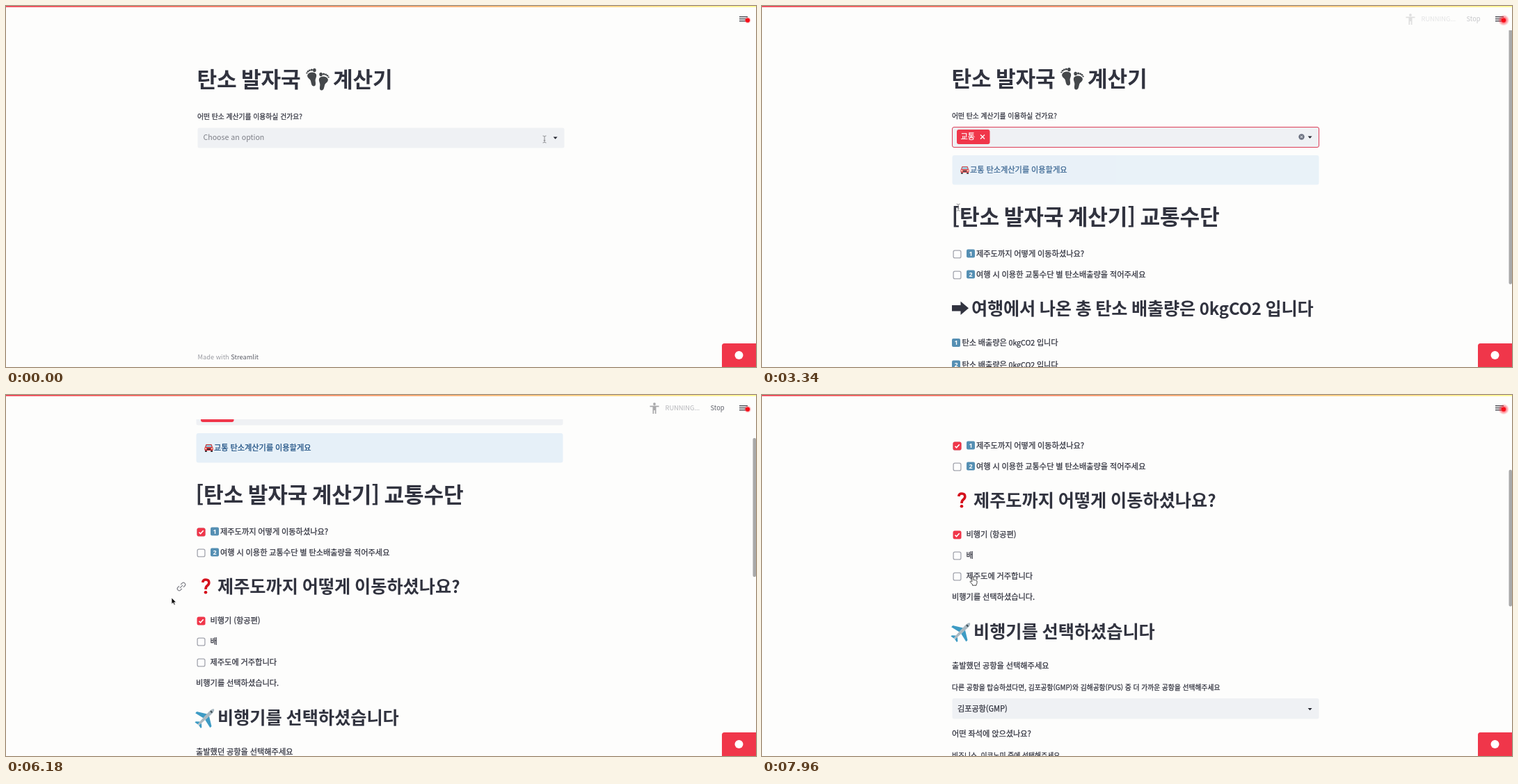
These frames come from a looping animation (1078x520 px, 8 s). An HTML page:

```html
<!DOCTYPE html>
<html lang="ko">
<head>
<meta charset="utf-8">
<title>탄소 발자국 계산기</title>
<style>
  html, body { margin: 0; width: 100%; height: 100%; overflow: hidden; background: #fdfdfc; }
  svg { display: block; }
  #stage { width: 1078px; height: 520px; }
  text { font-family: "Noto Sans CJK KR", "Noto Sans CJK", "Noto Sans", sans-serif; color: #31333f; fill: currentColor; white-space: pre; }
  .h1 { font-size: 31.2px; font-weight: 700; letter-spacing: -.2px; word-spacing: -1.9px; }
  .h2 { font-size: 25.2px; font-weight: 700; word-spacing: -1.2px; }
  .b { font-size: 11.2px; word-spacing: -.3px; }
  .s { font-size: 9.8px; }
  .b, .s { stroke: currentColor; stroke-width: .25; }
  .latin { font-size: .95em; }
  .foot { font-size: 9.25px; color: #9a9ba2; }
  .run { font-size: 9.3px; }
  .digit { font: 700 9px "Noto Sans", sans-serif; color: #fff; text-anchor: middle; }
  .box { fill: #fdfdfd; stroke: #a3a5ae; stroke-width: 1.3; }
  .field { fill: #eff1f4; }
  .red { fill: #f0364a; }
  .off { display: none; }
</style>
</head>
<body>
<svg id="stage" viewBox="0 0 1078 520">
  <defs>
    <linearGradient id="bar">
      <stop offset="0" stop-color="#f0364a"/>
      <stop offset=".5" stop-color="#fb9a62"/>
      <stop offset="1" stop-color="#fffb8c"/>
    </linearGradient>
    <radialGradient id="halo">
      <stop offset=".3" stop-color="#ff2030" stop-opacity=".75"/>
      <stop offset="1" stop-color="#ff2030" stop-opacity="0"/>
    </radialGradient>
    <filter id="shadow" x="-10%" y="-20%" width="120%" height="150%">
      <feDropShadow dx="0" dy="3" stdDeviation="4.5" flood-color="#1a2030" flood-opacity=".32"/>
    </filter>
    <g id="sole" fill="#45484b">
      <path d="M1.5 10C3 5 11 5 12.5 9C13.5 13 11 15 11.5 19C12 23 12 26 9.5 26C6.5 26 6.5 22 5.5 18C4.5 15 .8 14 1.5 10Z"/>
      <ellipse cx="10.3" cy="3" rx="2" ry="2.8"/>
      <circle cx="6.8" cy="2.4" r="1.5"/>
      <circle cx="4.2" cy="3.2" r="1.3"/>
      <circle cx="2.2" cy="4.8" r="1.2"/>
      <circle cx=".8" cy="7" r="1.1"/>
    </g>
    <rect id="key" width="12" height="12" rx="2" fill="#558fb3"/>
    <rect id="check" class="box" x="-5.4" y="-5.4" width="10.8" height="10.8" rx="2.2"/>
    <g id="tick">
      <rect class="red" x="-6" y="-6" width="12" height="12" rx="2.5"/>
      <path d="M-3 .2l2.1 2.2L3.2-2.3" fill="none" stroke="#fff" stroke-width="1.6"/>
    </g>
    <path id="caret" d="M-3-1.4h6L0 1.7z" fill="#22242e"/>
    <g id="chain" fill="none" stroke="#85868d" stroke-width="1.3" transform="rotate(-45)">
      <path d="M-1.5-2.7h-2.7a2.7 2.7 0 0 0 0 5.4h2.7M1.5-2.7h2.7a2.7 2.7 0 0 1 0 5.4h-2.7M-3 0h6"/>
    </g>
  </defs>

  <rect width="1078" height="520" fill="#fdfdfc"/>

  <g id="page">
    <text class="h1" x="274.5" y="117">탄소 발자국</text>
    <use href="#sole" transform="translate(431.5 89.5) scale(1.15 1)"/>
    <use href="#sole" transform="translate(464.5 95.5) scale(-1.15 1)"/>
    <text class="h1" x="470" y="117">계산기</text>
    <text class="s" x="275" y="162.6">어떤 탄소 계산기를 이용하실 건가요?</text>

    <rect id="select" class="field" x="275.5" y="175.5" width="527" height="29" rx="2.5"/>
    <text id="hint" x="283.5" y="193" style="font-size:10.6px;color:#7d7f87">Choose an option</text>
    <use href="#caret" x="789.6" y="190"/>
    <g id="tag">
      <rect class="red" x="282" y="179" width="47.5" height="21" rx="3"/>
      <text class="b" x="287.5" y="193.3" style="color:#fff">교통</text>
      <path d="M316 186.500l6 6m0-6l-6 6" stroke="#fff" stroke-width="1.3"/>
      <circle cx="777.5" cy="189.5" r="4.2" fill="#6e7483"/>
      <path d="M775.9 187.9l3.2 3.2m0-3.2l-3.2 3.2" stroke="#fff"/>
    </g>

    <g id="result">
      <g id="alert">
        <rect x="275.5" y="216" width="527" height="42.5" rx="3" fill="#e6f0f8"/>
        <g transform="translate(287 231)">
          <path d="M2.5 1h8l1.6 4.2H.9z" fill="#c92f35"/>
          <path d="M3.3 2h6.4l1 3H2.3z" fill="#8fc3d8"/>
          <rect x=".3" y="5" width="12.4" height="5" rx="1.5" fill="#d8343a"/>
          <path d="M1 10h2.8v2H1zM9.2 10H12v2H9.2zM4 7h5v2H4z" fill="#3c3035"/>
          <path d="M1.2 6.5h2v1.5h-2zM9.8 6.5h2v1.5h-2z" fill="#fff0c8"/>
        </g>
        <text class="b" x="301" y="241.1" style="color:#1a4d80">교통 탄소계산기를 이용할게요</text>
      </g>
      <text class="h1" x="274.5" y="316">[탄소 발자국 계산기] 교통수단</text>

      <use href="#check" x="282.5" y="358.5"/>
      <use id="tick1" href="#tick" x="282.5" y="358.5"/>
      <use href="#key" x="296" y="351.5"/><text class="digit" x="302" y="360.8">1</text>
      <text class="b" x="310" y="361.5">제주도까지 어떻게 이동하셨나요?</text>
      <use href="#check" x="282.5" y="388.5"/>
      <use href="#key" x="296" y="381.5"/><text class="digit" x="302" y="390.8">2</text>
      <text class="b" x="310" y="391.5">여행 시 이용한 교통수단 별 탄소배출량을 적어주세요</text>
      <use id="link" href="#chain" transform="translate(254 437)"/>

      <g id="total">
        <path d="M275 432h12.500v-5.500l11.500 9.800-11.500 9.800v-5.500H275z" fill="#31333f"/>
        <text class="h2" x="303" y="445.5" letter-spacing="-.15">여행에서 나온 총 탄소 배출량은 <tspan class="latin">0kgCO2</tspan> 입니다</text>
        <use href="#key" x="275" y="480"/><text class="digit" x="281" y="489.3">1</text>
        <text class="b" x="289.5" y="490.2" letter-spacing="-.05">탄소 배출량은 <tspan class="latin">0kgCO2</tspan> 입니다</text>
        <use href="#key" x="275" y="511.5"/><text class="digit" x="281" y="520.8">2</text>
        <text class="b" x="289.5" y="521.7" letter-spacing="-.05">탄소 배출량은 <tspan class="latin">0kgCO2</tspan> 입니다</text>
      </g>

      <g id="trip">
        <path d="M284.7 431q.3-4 4.5-4q4.6 0 4.6 4.3q0 2.6-2.6 4.4q-2.2 1.6-2.2 5.3" fill="none" stroke="#d5101c" stroke-width="3.6"/>
        <circle cx="289" cy="445.2" r="2.3" fill="#d5101c"/>
        <text class="h2" x="306" y="445.5">제주도까지 어떻게 이동하셨나요<tspan class="latin">?</tspan></text>
        <use href="#tick" x="282.5" y="486.5"/>
        <text class="b" x="295.5" y="489.8">비행기 (항공편)</text>
        <use href="#check" x="282.5" y="516.5"/>
        <text class="b" x="295.5" y="519.8">배</text>
        <use href="#check" x="282.5" y="546.5"/>
        <text class="b" x="295.5" y="549.8">제주도에 거주합니다</text>
        <text class="b" x="275" y="580">비행기를 선택하셨습니다.</text>
        <g transform="translate(289 625.5) rotate(45)">
          <path d="M-2-5L-15 3v3l13-3zM2-5l13 8v3L2 3zM-1.5 10L-6 14v2l5-1zM1.5 10L6 14v2l-5-1z" fill="#3d9bc4"/>
          <path d="M0-17c2 1 2.6 4 2.6 7L1.6 12 0 16l-1.6-4L-2.6-10c0-3 .6-6 2.6-7z" fill="#a9b9c2"/>
          <path d="M-1.6-12.5h3.2v2h-3.2z" fill="#37474f"/>
        </g>
        <text class="h2" x="306" y="635">비행기를 선택하셨습니다</text>
        <text class="b" x="275" y="679.3">출발했던 공항을 선택해주세요</text>
        <text class="s" x="275" y="709.8" letter-spacing="-.03">다른 공항을 탑승하셨다면, 김포공항(GMP)와 김해공항(PUS) 중 더 가까운 공항을 선택해주세요</text>
        <rect class="field" x="275.5" y="722" width="527" height="29.5" rx="2.5"/>
        <text class="b" x="283" y="741" letter-spacing="-.1">김포공항(GMP)</text>
        <use href="#caret" x="789.6" y="737.5"/>
        <text class="b" x="275" y="777.2">어떤 좌석에 앉으셨나요?</text>
        <text class="s" x="275" y="807.8">비즈니스, 이코노미 중에 선택해주세요</text>
      </g>
    </g>

    <g id="menu">
      <rect x="275.5" y="205" width="527" height="119" rx="2" fill="#fefefe" filter="url(#shadow)"/>
      <rect x="275.5" y="205" width="527" height="30" fill="#f0f2f2"/>
      <text class="b" x="287.5" y="223.1">교통</text>
      <text class="b" x="287.5" y="253.1">음식</text>
      <text class="b" x="287.5" y="283.1">관광</text>
      <text class="b" x="287.5" y="313.1">숙소</text>
    </g>
    <text id="footer" class="foot" x="275.5">Made with <tspan fill="#5a5c66" font-weight="500">Streamlit</tspan></text>
  </g>

  <rect id="thumb" x="1073.5" width="4.5" rx="2" fill="#a9a9a9"/>

  <rect width="1078" height="35" fill="#fdfdfc"/>
  <rect width="1078" height="1.6" fill="url(#bar)"/>
  <g id="running">
    <circle cx="932" cy="13" r="1.9" fill="#a9a9ab"/>
    <path d="M925.5 15.500h13v1.800h-4V27h-1.700v-5h-1.600v5h-1.700v-9.700h-4z" fill="#a9a9ab"/>
    <text class="run" x="947.5" y="22.4" style="color:#b4b5b9">RUNNING...</text>
    <text class="run" x="1012.5" y="22.4" style="color:#62646d">Stop</text>
  </g>
  <path d="M1054 15.700h12M1054 18.700h12M1054 21.700h12" stroke="#34363f" stroke-width="1.3"/>
  <circle id="glow" cx="1066" cy="20.5" fill="url(#halo)"/>
  <circle cx="1066" cy="20.5" r="3.1" fill="#f80d18"/>

  <path class="red" d="M1029 520v-30.500q0-3.500 3.500-3.500H1078v34z"/>
  <circle cx="1053.5" cy="503" r="6" fill="#fff"/>

  <g id="mouse">
    <path id="ibeam" d="M-2.5-5q2.5 0 2.5 1.500q0-1.500 2.500-1.500M0-3.500v7M-2.500 5q2.500 0 2.500-1.500q0 1.500 2.500 1.500M-1.300 1.500h2.600" fill="none" stroke="#77787c" stroke-width=".8"/>
    <path id="hand" d="M-2.2 1V-5q0-1.200 1.100-1.200T0-5v3.500q1.200-.7 1.800.2 1.200-.5 1.700.4 1.300-.3 1.500 1V2.500q0 1.500-1 2.500v1.200h-5.500V5L-4.800 1.300q-.3-1.500 1.100-1.300z" fill="#fff" stroke="#333" stroke-width=".9"/>
    <path id="arrow" d="M-2-5v9.300l2.200-2 1.500 3.300 1.500-.7L1.800 1.700h2.900z" fill="#111" stroke="#fff" stroke-width=".7"/>
  </g>
</svg>

<script>
const LOOP = 8000;
const $ = id => document.getElementById(id);
const between = (t, a, b) => t >= a && t < b;
const show = (id, on) => $(id).classList.toggle("off", !on);
const clamp = v => Math.max(0, Math.min(1, v));
const ease = p => p * p * (3 - 2 * p);

// Each key is [time, ...values]; values are eased between neighbours.
function track(keys, t) {
  const i = keys.findIndex(k => k[0] > t);
  if (i < 0) return keys[keys.length - 1].slice(1);
  const a = keys[i - 1], b = keys[i];
  const p = ease((t - a[0]) / (b[0] - a[0]));
  return a.slice(1).map((v, j) => v + (b[j + 1] - v) * p);
}

const mousePath = [
  [0, 774, 192], [1500, 774, 192], [2000, 464, 231], [2600, 464, 231],
  [3250, 282, 289], [3660, 283, 298], [4300, 283, 298], [4800, 281, 200],
  [5250, 281, 200], [5850, 240, 297], [6180, 240, 297], [6600, 234, 300],
  [7020, 238, 299], [7300, 240, 299], [7850, 304, 268], [8000, 304, 268]
];
const scrollPath = [
  [0, 1], [3400, 1], [3650, 152], [3700, 152], [4100, 161], [6300, 161],
  [6980, 281], [7050, 281], [7450, 285], [8000, 285]
];
const cursorTimes = [
  [0, "ibeam"], [1550, "hand"], [2700, "arrow"], [2950, "ibeam"],
  [4450, "hand"], [5350, "arrow"], [7600, "hand"]
];

const LOADED = 3100, TRIP = 6040;

function render(t) {
  const loaded = t >= LOADED, trip = t >= TRIP;
  const scroll = loaded ? track(scrollPath, t)[0] : 0;
  const height = trip ? (t < 6500 ? 1352 : 1375) : 676;

  $("page").setAttribute("transform", `translate(${loaded ? -2 : 0} ${-scroll})`);
  show("menu", between(t, 1450, 2650));
  show("tag", t >= 2650);
  show("hint", t < 2650);
  show("result", loaded);
  show("total", !trip);
  show("trip", trip);
  show("tick1", t >= 5150);
  show("link", between(t, 3600, 4420) || between(t, TRIP, 6550));
  show("footer", !trip);
  $("footer").setAttribute("y", loaded ? 665.5 : 509);
  $("alert").style.opacity = t < 3420 ? .85 : 1;
  $("select").style.stroke = between(t, 1450, 5150) ? "#dc3c57" : "none";

  show("thumb", loaded);
  $("thumb").setAttribute("y", scroll * 520 / height);
  $("thumb").setAttribute("height", 520 * 520 / height);

  const fade = (a, b, c, d) => Math.min(clamp((t - a) / (b - a)), clamp((d - t) / (d - c)));
  $("running").style.opacity = Math.max(fade(2800, 2950, 3240, 3395), fade(5250, 5400, 6500, 6700));
  $("glow").setAttribute("r", 5 + 2 * (1 - Math.cos(2 * Math.PI * t / 1260)));

  const [x, y] = track(mousePath, t);
  $("mouse").setAttribute("transform", `translate(${x} ${y})`);
  const kind = cursorTimes.filter(c => c[0] <= t).pop()[1];
  for (const id of ["ibeam", "hand", "arrow"]) show(id, id === kind);
}

const start = performance.now();
function tick() {
  render((performance.now() - start) % LOOP);
  requestAnimationFrame(tick);
}
tick();
</script>
</body>
</html>
```
